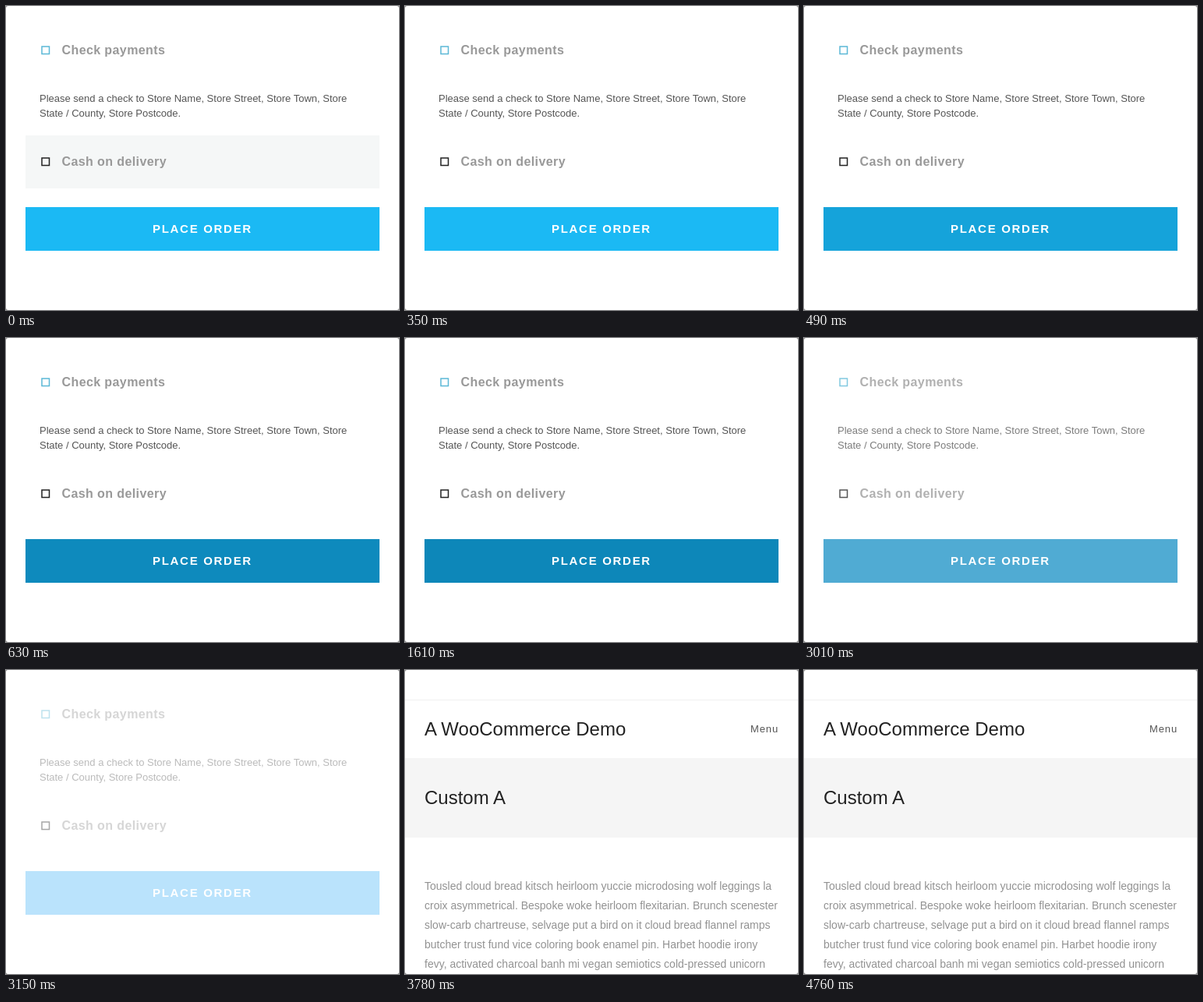
Write an HTML page that moves like this. It is 504x390 px and loops after 6.72 s.

```html
<!DOCTYPE html>
<html lang="en">
<head>
<meta charset="utf-8">
<title>Checkout</title>
<style>
  html, body { margin: 0; width: 100%; height: 100%; overflow: hidden; background: #888; }
  svg { display: block; width: 504px; height: 390px; background: #fff; border-radius: 3px;
        font-family: "Liberation Sans", Arial, sans-serif; }
  .label { font-weight: bold; font-size: 16px; letter-spacing: .4px; fill: #999; }
  .note { font-size: 13px; fill: #555; }
  .box { fill: none; stroke-width: 1.5; }
  .order { font-weight: bold; font-size: 15px; letter-spacing: 1.7px; fill: #fff; }
  .title { font-size: 24px; fill: #222; }
  .menu { font-size: 13px; letter-spacing: .9px; fill: #555; }
  .body { font-size: 14px; fill: #929292; }
</style>
</head>
<body>
<svg viewBox="0 0 504 390">
  <g id="checkout">
    <rect id="row" x="25" y="166" width="454" height="68" fill="#f5f7f7"/>
    <rect class="box" x="46" y="52" width="9.5" height="9.5" stroke="#5bb8d6"/>
    <text class="label" x="71.5" y="62">Check payments</text>
    <g class="note">
      <text x="43" y="123">Please send a check to Store Name, Store Street, Store Town, Store</text>
      <text x="43" y="142">State / County, Store Postcode.</text>
    </g>
    <rect class="box" x="46" y="195" width="9.5" height="9.5" stroke="#222"/>
    <text class="label" x="71.5" y="205">Cash on delivery</text>
    <rect id="veil" width="504" height="390" fill="#fff"/>
    <rect id="button" x="25" y="258" width="454" height="56"/>
    <text class="order" x="188" y="291">PLACE ORDER</text>
  </g>
  <g id="page">
    <rect y="38" width="504" height="1" fill="#f1f1f1"/>
    <rect y="113" width="504" height="102" fill="#f5f5f5"/>
    <text class="title" x="25" y="84">A WooCommerce Demo</text>
    <text class="menu" x="443" y="80">Menu</text>
    <text class="title" x="25" y="172">Custom A</text>
    <g class="body">
      <text x="25" y="282">Tousled cloud bread kitsch heirloom yuccie microdosing wolf leggings la</text>
      <text x="25" y="307">croix asymmetrical. Bespoke woke heirloom flexitarian. Brunch scenester</text>
      <text x="25" y="332">slow-carb chartreuse, selvage put a bird on it cloud bread flannel ramps</text>
      <text x="25" y="357">butcher trust fund vice coloring book enamel pin. Harbet hoodie irony</text>
      <text x="25" y="382">fevy, activated charcoal banh mi vegan semiotics cold-pressed unicorn</text>
    </g>
  </g>
</svg>
<script>
  const LOOP = 6720, STEP = 70, PAGE_AT = 3780;
  const IDLE = [27, 185, 244], HOVER = [13, 135, 185], DISABLED = [186, 227, 252];
  const el = id => document.getElementById(id);
  const [checkout, page, row, veil, button] =
    ['checkout', 'page', 'row', 'veil', 'button'].map(el);

  const progress = (t, start, length) => Math.min(1, Math.max(0, (t - start) / length));
  const easeOut = p => 1 - (1 - p) ** 2;
  const swing = p => .5 - Math.cos(p * Math.PI) / 2;
  const mix = (a, b, p) => a.map((v, i) => v + (b[i] - v) * p);

  function draw(now) {
    const t = Math.floor(now % LOOP / STEP) * STEP;
    const hover = easeOut(progress(t, 420, 280));
    const block = swing(progress(t, 2905, 245));
    const loaded = t >= PAGE_AT;

    checkout.style.display = loaded ? 'none' : '';
    page.style.display = loaded ? '' : 'none';
    row.style.opacity = 1 - easeOut(progress(t, 0, 350));
    veil.style.opacity = .6 * block;
    const color = mix(mix(IDLE, HOVER, hover), DISABLED, block).map(Math.round);
    button.setAttribute('fill', `rgb(${color})`);
  }

  const start = performance.now();
  function tick() {
    draw(performance.now() - start);
    requestAnimationFrame(tick);
  }
  tick();
</script>
</body>
</html>
```
